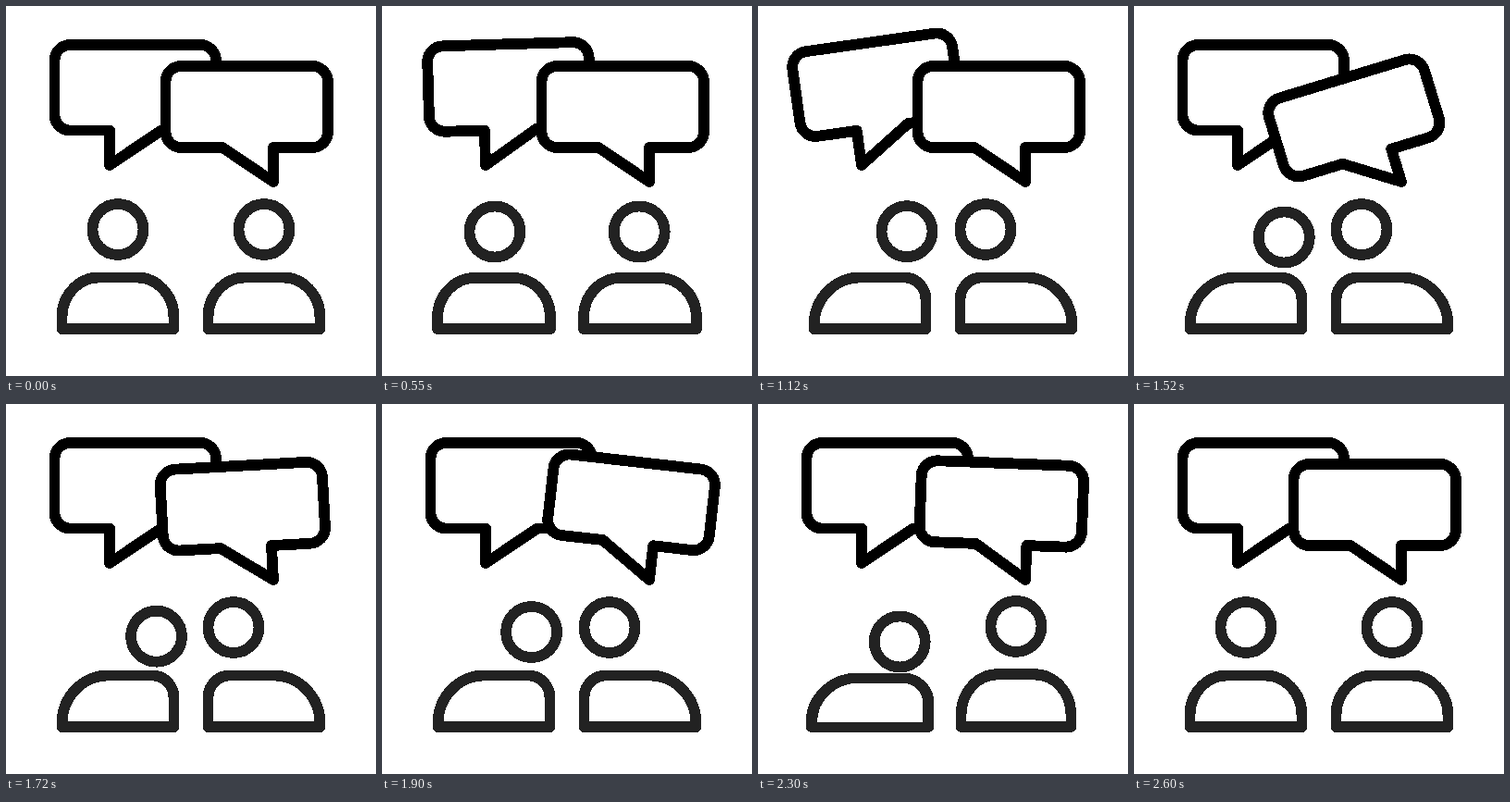
These frames come from a looping animation (400 px wide and 400 px high, 2.62 s). An HTML page:

```html
<!DOCTYPE html>
<html lang="en">
<head>
<meta charset="utf-8">
<title>Conversation</title>
<style>
  html, body { margin: 0; width: 100%; height: 100%; overflow: hidden; background: #fff; }
  svg { display: block; width: 100vw; height: 100vh; shape-rendering: crispEdges; }
  svg * { stroke-width: 11.8; stroke-linejoin: round; stroke-linecap: round; }
  .bubble { fill: #fff; stroke: #000; }
  .person { fill: none; stroke: #222; }
</style>
</head>
<body>
<svg viewBox="0 0 400 400">
  <path class="bubble" id="bubbleL" d="M69.5 42H210a17 17 0 0 1 17 17V117.5a17 17 0 0 1-17 17H168L112 172V134.5H69.5a17 17 0 0 1-17-17V59a17 17 0 0 1 17-17Z"/>
  <path class="bubble" id="bubbleR" d="M189.5 65H331a17 17 0 0 1 17 17V136a17 17 0 0 1-17 17H289V190L234 153H189.5a17 17 0 0 1-17-17V82a17 17 0 0 1 17-17Z"/>
  <g class="person" id="personL"><circle r="27.5"/><path/></g>
  <g class="person" id="personR" transform="matrix(-1 0 0 1 400 0)"><circle r="27.5"/><path/></g>
</svg>
<script>
const LOOP = 2620;
const $ = id => document.getElementById(id);
const mix = (a, b, p) => a + (b - a) * p;
const ease = p => (1 - Math.cos(Math.PI * p)) / 2;

// Eased value at time t from a list of [time, value] steps.
function track(t, keys) {
  if (t <= keys[0][0]) return keys[0][1];
  for (let i = 1; i < keys.length; i++) {
    const [t0, a] = keys[i - 1], [t1, b] = keys[i];
    if (t < t1) return mix(a, b, ease((t - t0) / (t1 - t0)));
  }
  return keys[keys.length - 1][1];
}

const bubbles = [
  { el: $('bubbleL'), tip: '112 172',
    swing: [[520, 0], [685, -20], [890, 12], [1085, -9], [1280, 3], [1480, 0]] },
  { el: $('bubbleR'), tip: '289 190',
    swing: [[1400, 0], [1605, -26.5], [1818, 14.5], [2022, -8], [2229, 3], [2436, 0]] }
];

// A dip while leaning in or out, followed by a small rebound.
const hop = (t0, depth, rebound) =>
  [[t0, 0], [t0 + 120, depth], [t0 + 250, rebound], [t0 + 390, 0]];

const person = (id, reach, back, nod) => ({
  head: $(id).children[0],
  body: $(id).children[1],
  reach, nod,
  lean: [[525, 0], [790, 1], [back + 35, 1], [back + 285, 0]],
  dip: [...hop(520, 16, -1.3), ...hop(back, 16, -1.3)],
  squash: [...hop(520, 3, -1.5), ...hop(back, 3, -1.5)]
});

const people = [
  person('personL', 39.6, 2195, [[850, 0], [1720, 9.7], [2090, 0]]),
  person('personR', 33, 2012, [[0, 0]])
];

function bodyPath(lean) {
  const l = 60.5, r = 181.5, top = 293.5, base = 349;
  const lx = mix(40, 50, lean), ly = mix(43, 52, lean);
  const rx = mix(40, 23, lean), ry = mix(43, 24, lean);
  return `M${l} ${base}V${top + ly}A${lx} ${ly} 0 0 1 ${l + lx} ${top}` +
    `H${r - rx}A${rx} ${ry} 0 0 1 ${r} ${top + ry}V${base}Z`;
}

function draw(t) {
  for (const b of bubbles)
    b.el.setAttribute('transform', `rotate(${track(t, b.swing)} ${b.tip})`);

  for (const p of people) {
    const lean = track(t, p.lean), nod = track(t, p.nod);
    const s = track(t, p.squash) / 66;
    p.head.setAttribute('cx', 121 + p.reach * lean + nod * 0.2);
    p.head.setAttribute('cy', 241.5 + track(t, p.dip) + nod);
    p.body.setAttribute('d', bodyPath(lean));
    p.body.setAttribute('transform',
      `translate(121 355) scale(${1 + s} ${1 - s}) translate(-121 -355)`);
  }
}

const start = performance.now();
function tick() {
  draw((performance.now() - start) % LOOP);
  requestAnimationFrame(tick);
}
tick();
</script>
</body>
</html>
```
